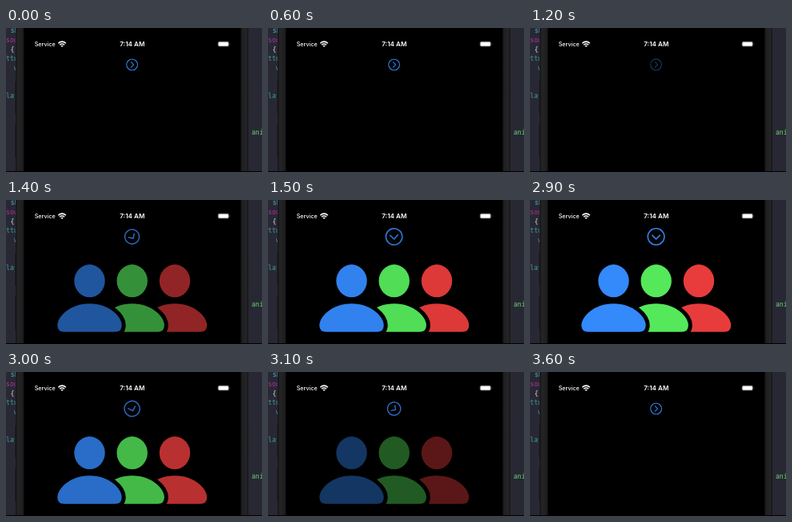
These frames come from a looping animation (320 by 181 pixels, 4.7 s). An HTML page:

```html
<!DOCTYPE html>
<html lang="en">
<head>
<meta charset="utf-8">
<title>Disclosure button</title>
<style>
  html, body { margin: 0; width: 100%; height: 100%; overflow: hidden; background: #000; }
  svg { display: block; width: 100vw; height: 100vh; }
  .code { font: 8.2px "DejaVu Sans Mono", monospace; white-space: pre; }
  .status { font: 500 7.2px Inter, sans-serif; fill: #fff; }
  .time { font-size: 8.1px; font-weight: 600; text-anchor: middle; }
</style>
</head>
<body>
<svg viewBox="0 0 320 181" preserveAspectRatio="none">
  <defs>
    <linearGradient id="bezel">
      <stop offset="0" stop-color="#141416"/>
      <stop offset=".25" stop-color="#242426"/>
      <stop offset=".75" stop-color="#202022"/>
      <stop offset="1" stop-color="#101011"/>
    </linearGradient>
    <g id="person">
      <ellipse cy="101.7" rx="19.2" ry="20.6"/>
      <path d="M-32 165.7Q-40.2 165.7-40.2 157.5C-40.2 147-25 130.3 0 130.3S40.2 147 40.2 157.5Q40.2 165.7 32 165.7Z"
            stroke="#000" stroke-width="10" paint-order="stroke"/>
    </g>
  </defs>

  <rect width="320" height="181" fill="#282834"/>
  <g class="code">
    <text x="5.8" y="6" fill="#4fb3c2">sh</text>
    <text x="0" y="18" fill="#b52e9c">sou</text>
    <text x="5.5" y="29.5" fill="#dededf">{</text>
    <text x="0" y="41" fill="#3f9f9c">ttu</text>
    <text x="10" y="52.5" fill="#3f8f96">w</text>
    <text x="0" y="87.5" fill="#3f9fa6">lay</text>
    <text x="306.9" y="134.3" fill="#68d66c">ani</text>
  </g>

  <g fill="#17171a" stroke="#3a3a3e" stroke-width=".5">
    <rect x="10.8" y="66" width="4" height="42.5" rx="1"/>
    <rect x="10.8" y="120.5" width="4" height="43" rx="1"/>
    <rect x="300" y="66" width="3.6" height="43" rx="1"/>
  </g>
  <rect x="12" width="11" height="181" fill="url(#bezel)"/>
  <rect x="-303" width="10" height="181" fill="url(#bezel)" transform="scale(-1 1)"/>
  <rect x="22.5" width="270.7" height="181"/>
  <rect y="180" width="320" height="1"/>

  <text class="status" x="35.7" y="23">Service</text>
  <text class="status time" x="157.8" y="23">7:14 AM</text>
  <g fill="none" stroke="#fff" stroke-width="1.5">
    <path d="M65.3 19.3Q70.1 15 74.9 19.3M67.1 21.2Q70.1 18.7 73.1 21.2"/>
    <path d="M68.4 22.3Q70.1 21 71.8 22.3L70.1 24Z" fill="#fff" stroke="none"/>
  </g>
  <rect x="264.8" y="16.8" width="14.2" height="6.6" rx="2" fill="none" stroke="#555" stroke-width=".5"/>
  <rect x="265.4" y="17.4" width="12.8" height="5.4" rx="1.4" fill="#fff"/>
  <path d="M279.8 19Q281 20.1 279.8 21.2Z" fill="#777"/>

  <g id="people">
    <use href="#person" x="211" fill="#e83c3c"/>
    <use href="#person" x="157.7" fill="#55e85b"/>
    <use href="#person" x="104.5" fill="#3489fb"/>
  </g>

  <g id="icon" fill="none" stroke="#327bdc" stroke-width="1.15" stroke-linecap="round" stroke-linejoin="round">
    <circle r="6.9"/>
    <path d="M-1.2-3.2L2 0L-1.2 3.2"/>
  </g>
</svg>
<script>
  const LOOP = 4700, STEP = 100, FADE = 350;
  const people = document.getElementById("people");
  const icon = document.getElementById("icon");

  const clamp = x => Math.min(1, Math.max(0, x));
  const ease = x => x * x * (3 - 2 * x);
  const ramp = (t, start) => ease(clamp((t - start) / FADE));

  // Piecewise linear value through [time, value] pairs.
  function track(t, keys) {
    let [t0, v0] = keys[0];
    for (const [t1, v1] of keys) {
      if (t < t1) return v0 + (v1 - v0) * clamp((t - t0) / (t1 - t0));
      [t0, v0] = [t1, v1];
    }
    return v0;
  }

  const press = [[1000, 1], [1100, .75], [1200, .45], [1400, .85], [1600, 1],
                 [2900, 1], [3000, .8], [3100, .9], [3300, 1]];

  function draw(ms) {
    const t = Math.floor((ms % LOOP) / STEP) * STEP;
    const open = ramp(t, 1195) - ramp(t, 2900);
    people.setAttribute("opacity", open);
    icon.setAttribute("opacity", track(t, press));
    icon.setAttribute("transform",
      `translate(157.6 46.1) rotate(${90 * open}) scale(${1 + .5 * open})`);
  }

  const start = performance.now();
  function tick() {
    draw(performance.now() - start);
    requestAnimationFrame(tick);
  }
  tick();
</script>
</body>
</html>
```
